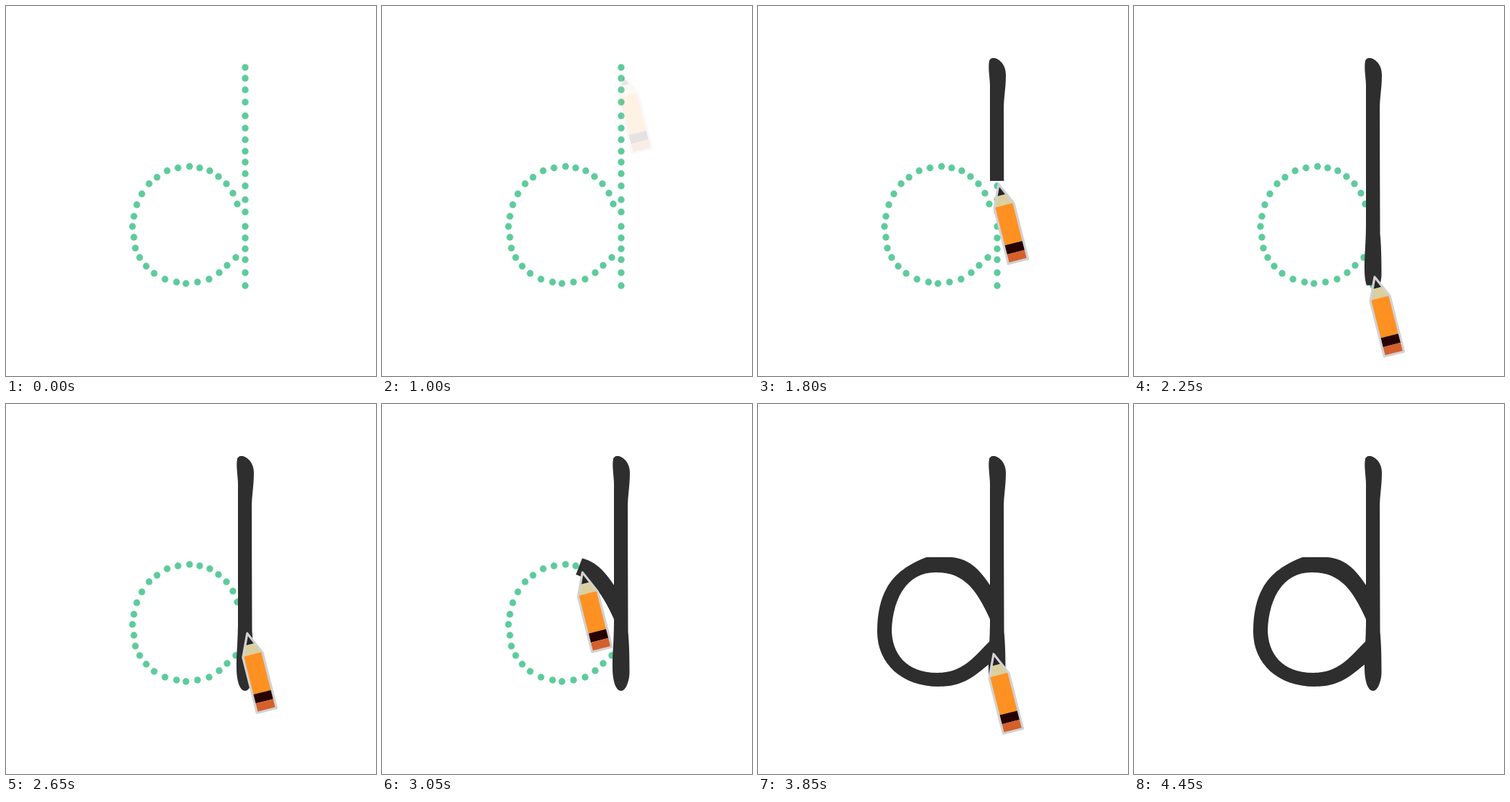
Write an HTML page that moves like this. It is 512 px wide and 512 px high and loops after 5.5 s.

```html
<!DOCTYPE html>
<html lang="en">
<head>
<meta charset="utf-8">
<title>Tracing the letter d</title>
<style>
  html, body { margin: 0; width: 100%; height: 100%; overflow: hidden; background: #fff; }
  svg { display: block; width: 100%; height: 100%; }
  mask path { fill: none; stroke: #fff; }
  #ink { fill: #2e2e2e; }
  #dots { fill: #5ecb9c; }
</style>
</head>
<body>
<svg viewBox="0 0 512 512">
  <defs>
    <mask id="stemMask" maskUnits="userSpaceOnUse" x="0" y="0" width="512" height="512">
      <path id="stemReveal" pathLength="1" stroke-width="40" d="M331 70V400"/>
    </mask>
    <mask id="bowlMask" maskUnits="userSpaceOnUse" x="0" y="0" width="512" height="512">
      <path id="bowlReveal" pathLength="1" stroke-width="36"
        d="M332 306C318 272 298 222 250 222C200 222 175 262 175 308C175 352 205 381 250 381C285 381 305 360 338 327"/>
    </mask>
    <path id="bowlTrack"
      d="M334 304.5C325 278 300 228 250 227C200 227 172 265 172 310C172 355 205 389 250 388.5C285 387 310 362 330 342"/>
  </defs>
  <g id="dots"></g>
  <g id="ink">
    <path mask="url(#stemMask)"
      d="M325 72C330 71 343 78 343 95C343 115 340 125 340 145L340.500 315C342 330 342.500 350 342.500 372C342 385 337 397 331 397C323 397 319 382 319 365C319 340 321 330 321 300V110C321 100 318 85 320 76C321 73 323 72 325 72Z"/>
    <path mask="url(#bowlMask)"
      d="M322 252C308 232 295 214 267 212H233C195 227 165 250 165 315C165 360 200 391 250 391C285 391 300 376 322 358V327C300 348 285 372 248 372C205 372 185 345 185 312C187 270 205 233 246 233C284 233 302 255 322 300Z"/>
  </g>
  <g id="pencil">
    <path fill="#dccf9f" d="M0 0L14 31H-14Z"/>
    <path fill="#262626" d="M0 0L7 15.500H-7Z"/>
    <path fill="#ff9122" d="M-14 30H14V84H-14Z"/>
    <path fill="#260200" d="M-14 84H14V97H-14Z"/>
    <path fill="#d4602b" d="M-14 97H14V110H-14Z"/>
    <path fill="none" stroke="#d2d2d2" stroke-width="3.200" stroke-linejoin="round"
      d="M0 0L14 31V110H-14V31Z"/>
  </g>
</svg>
<script>
const LOOP = 5500, STEP = 50;
const byId = id => document.getElementById(id);
const clamp = v => Math.max(0, Math.min(1, v));

const stemDots = [85, 100, 116, 133, 152, 169, 185, 201, 216, 232, 249, 268, 285, 305, 321, 336, 351, 369, 387];
const bowlDots = [
  [320, 274], [314, 259], [305, 246], [294, 236], [282, 228], [268, 224], [254, 222], [238, 224],
  [223, 228], [209, 237], [198, 246], [188, 260], [181, 275], [177, 291], [175, 305], [177, 320],
  [179, 335], [185, 348], [194, 360], [205, 370], [220, 378], [236, 382], [249, 384], [265, 382],
  [281, 378], [295, 369], [306, 359], [318, 348]
];
byId('dots').innerHTML = [...stemDots.map(y => [331, y]), ...bowlDots]
  .map(([x, y]) => `<circle cx="${x}" cy="${y}" r="4.700"/>`).join('');

// Smooth monotone curve through [time, value] keys, at rest at both ends.
function smoothKeys(keys) {
  const slopes = keys.slice(1).map(([t, v], i) => (v - keys[i][1]) / (t - keys[i][0]));
  const tangents = keys.map((_, i) => {
    const a = slopes[i - 1], b = slopes[i];
    return a && b ? 2 * a * b / (a + b) : 0;
  });
  return time => {
    if (time <= keys[0][0]) return keys[0][1];
    const next = keys.findIndex(([t]) => t > time);
    if (next < 0) return keys[keys.length - 1][1];
    const [t0, v0] = keys[next - 1], [t1, v1] = keys[next];
    const d = t1 - t0, u = (time - t0) / d, w = 1 - u;
    return w * w * ((1 + 2 * u) * v0 + u * d * tangents[next - 1])
         + u * u * ((1 + 2 * w) * v1 - w * d * tangents[next]);
  };
}

const stemProgress = smoothKeys([[1400, 0], [1550, 0.186], [2150, 0.911], [2250, 0.959], [2350, 1]]);
const liftProgress = smoothKeys([[2350, 0], [2750, 1]]);
const bowlProgress = smoothKeys([[2750, 0], [3050, 0.2], [3350, 0.65], [3450, 0.764], [3850, 0.988], [3950, 1]]);

const pencil = byId('pencil'), track = byId('bowlTrack');
const trackLength = track.getTotalLength();

function reveal(id, amount) {
  byId(id).style.strokeDasharray = `${amount} 2`;
}

function pencilTip(t, stem, bowl) {
  if (t < 2750) {
    const lift = liftProgress(t);
    return { x: 333 + lift, y: 94 + 293 * stem - 82.5 * lift };
  }
  return track.getPointAtLength(bowl * trackLength);
}

function draw(t) {
  const stem = stemProgress(t), bowl = bowlProgress(t);
  reveal('stemReveal', stem);
  reveal('bowlReveal', bowl > 0 ? clamp(bowl + 0.015) : 0);

  const { x, y } = pencilTip(t, stem, bowl);
  pencil.setAttribute('transform', `translate(${x} ${y}) rotate(-14.2)`);
  const visible = t >= 1000 && t < 4450;
  pencil.setAttribute('opacity', visible ? Math.min(clamp((t - 950) / 450), clamp((4450 - t) / 500)) : 0);
}

const start = performance.now();
function tick() {
  const t = (performance.now() - start) % LOOP;
  draw(Math.floor(t / STEP) * STEP);
  requestAnimationFrame(tick);
}
tick();
</script>
</body>
</html>
```
